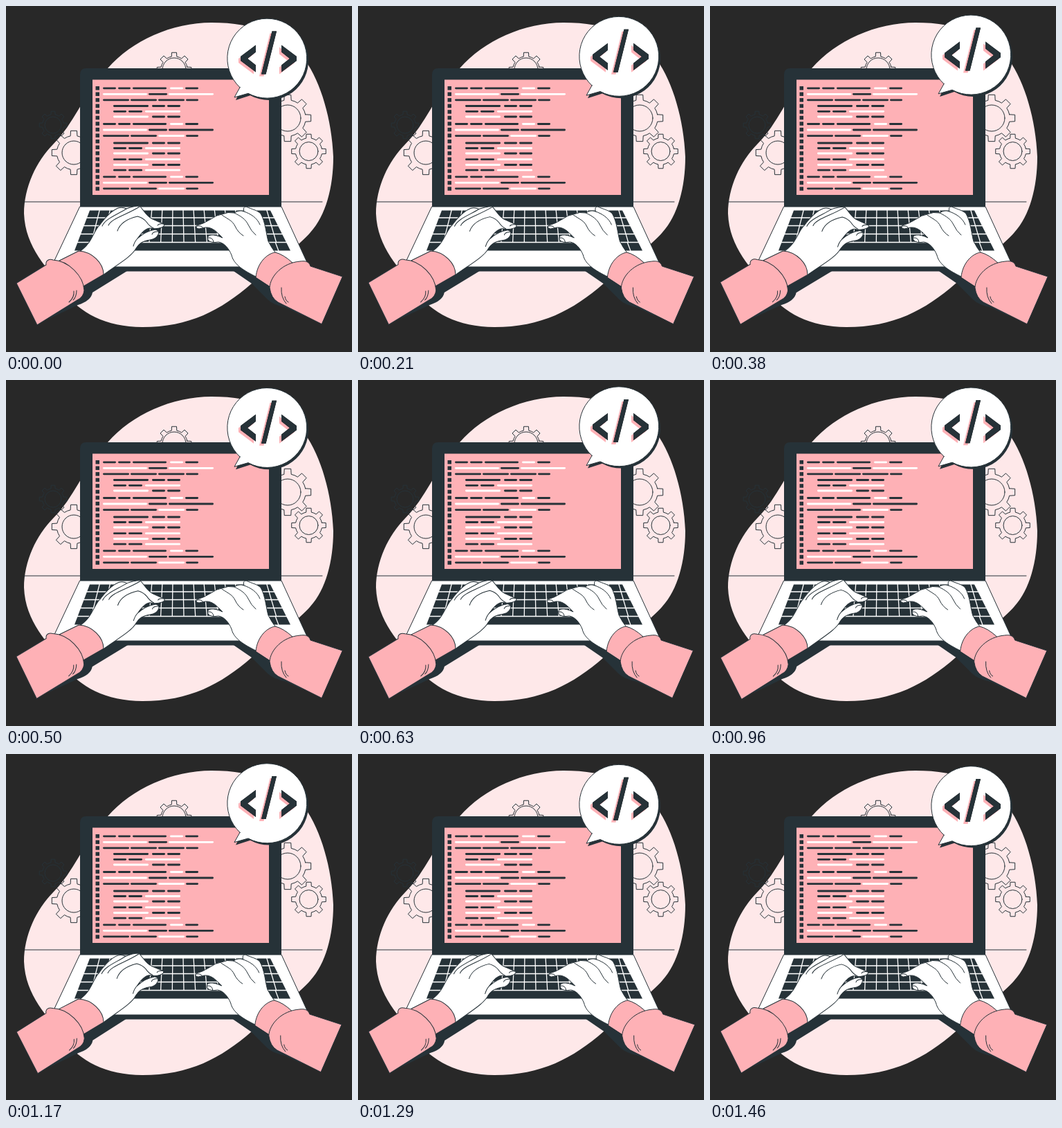
An HTML page for the animation above (1500 ms loop, 500 by 500 pixels).

```html
<!DOCTYPE html>
<html lang="en">
<head>
<meta charset="utf-8">
<title>Typing code</title>
<style>
  html, body { margin: 0; height: 100%; overflow: hidden; background: #282828; }
  svg { display: block; width: 100vw; height: 100vh; }
  .dark { fill: #263238; }
  .pink { fill: #feb1b6; }
  .white { fill: #fff; }
  .line { fill: none; }
  .line, .edge { stroke: #263238; stroke-width: 1; stroke-linecap: round; stroke-linejoin: round; }
</style>
</head>
<body>
<svg viewBox="0 0 500 500">
  <path fill="#fee8e9" d="M297 24C240 24 182 50 147 90C107 135 100 168 68 200C44 224 26 262 26 300C28 350 60 378 85 413C105 443 145 464 197 464C265 464 310 440 355 401C390 370 425 345 440 327C462 303 473 262 473 218C471 165 455 110 432 78C405 42 360 24 297 24Z"/>
  <g id="gears" class="line"></g>
  <path class="line" d="M26 283H457"/>

  <path class="dark" d="M107 290V99Q107 90 116 90H389Q398 90 398 99V290Z"/>
  <path class="pink" d="M125 106.500H380V273H125Z"/>
  <g id="code" stroke-width="2.8" stroke-linecap="round"></g>

  <path class="dark" d="M66 377H438V383.500H66Z"/>
  <path class="white edge" d="M107 290H398L438 377H66Z"/>
  <path class="dark" d="M121 295.500H382L411 353.500H99Z"/>
  <path id="keys" fill="none" stroke="#fff" stroke-width="1.3"/>

  <g id="left">
    <path class="dark" d="M62 452L104 432Q123 426 125 414L183 378L130 380Z"/>
    <path class="white edge" d="M106 355C124 344 126 326 135 317C143 306 152 296 162 292Q168 290 174 293Q184 289 193 289C200 296 203 304 212 308Q221 312 228 315Q230 318 225 320Q217 323 209 321Q201 320 190 336Q202 325 216 323Q222 325 220 330Q217 337 208 338C196 340 192 344 188 350C182 362 160 374 140 389Z"/>
    <path class="line" d="M139 318C144 307 160 302 174 293M148 317C152 307 174 302 193 290M161 325C165 313 177 307 190 304Q198 306 203 312Q207 318 213 321M219 317Q221 314 228 315M190 336Q186 340 184 347M211 330Q212 326 219 326"/>
    <path class="pink edge" d="M77 368L105 354C125 355 141 372 141 388L112 405Z"/>
    <path class="pink edge" d="M15 400.500L58 374C57 368 62 365 68 367C90 368 112 390 113 411Q112 421 103 425L45 461Z"/>
    <path class="line" d="M91 428Q99 421 98 412M97 425Q102 420 102 411"/>
  </g>

  <g id="right">
    <path class="dark" d="M320 377L355 401L378 424Q386 432 405 436L430 448L380 378Z"/>
    <path class="white edge" d="M361 391C345 383 329 374 326 360C322 350 315 342 307 341Q296 343 292 338Q290 332 296 331Q302 330 313 335L306 328Q297 319 288 320L279 322Q273 321 276 317Q285 315 296 308Q304 302 312 301Q321 297 330 299Q337 294 344 297Q342 290 347 290C356 294 363 295 368 300C375 312 376 330 379 340Q384 350 389 356Z"/>
    <path class="line" d="M312 302C322 309 327 310 331 318Q335 327 343 332M330 299C340 304 346 308 350 316Q354 325 361 331M344 297C353 300 363 306 367 316M276 318Q283 317 284 320M292 335Q299 334 300 341"/>
    <path class="pink edge" d="M361 392C363 371 377 358 389 356Q401 359 414 371L384 407Z"/>
    <path class="pink edge" d="M486 391L440 376C438 369 432 368 425 369C400 371 382 390 381 407Q383 422 393 428L456 459.500Z"/>
    <path class="line" d="M398 407Q397 421 405 430M403 420Q404 426 408 428"/>
  </g>

  <g id="bubble">
    <path class="dark" d="M340 119.600L332 136L353 129.200A57 57 0 1 0 340 119.600Z"/>
    <path class="white edge" d="M338 117.700L330 132L350 126.300A57.500 57.500 0 1 0 338 117.700Z"/>
    <g class="pink" transform="translate(-3 3)"><use href="#tag"/></g>
    <path id="tag" d="M361 56.500V66.500L349 76L361 85.500V95.500L339 79V73ZM384.500 36.500H391L375.500 98.500H369ZM398 56.500L420 73V79L398 95.500V85.500L410 76L398 66.500Z"/>
    <use href="#tag" class="dark"/>
  </g>
</svg>
<script>
const DARK = '#263238', LOOP = 1500;
const $ = id => document.getElementById(id);

function gear(cx, cy, outer, hole) {
  const at = (r, a) => `${cx + r * Math.cos(a)} ${cy + r * Math.sin(a)}`;
  const root = outer * 0.77;
  let d = '';
  for (let i = 0; i < 8; i++) {
    const a = i * Math.PI / 4;
    d += `${i ? `A${root} ${root} 0 0 1 ` : 'M'}${at(root, a - 0.2)}L${at(outer, a - 0.14)}L${at(outer, a + 0.14)}L${at(root, a + 0.2)}`;
  }
  d += `A${root} ${root} 0 0 1 ${at(root, -0.2)}Z`;
  return `<path d="${d}"/><circle cx="${cx}" cy="${cy}" r="${hole}"/>`;
}
$('gears').innerHTML = gear(243, 92, 25, 17) + gear(98, 212, 32, 17) +
  gear(68, 172, 20, 12) + gear(407, 162, 34, 19) + gear(437.5, 210, 25, 13.5);

// Segment layouts as [start, end] pairs; each row adds one colour letter per segment.
const layouts = {
  a: [[140, 159], [162, 180], [183, 232], [237, 256], [259, 278]],
  b: [[140, 204], [206, 233], [235, 300]],
  c: [[140, 178], [180, 218], [220, 258], [260, 278]],
  d: [[155, 206], [211, 230], [233, 252]],
  e: [[155, 174], [177, 197], [201, 252]]
};
const rows = `118.8 a dddwd,127.3 b wdw,135.8 c dddd,144.5 d ddd,152.3 e ddw,160 d wdd,
  170.5 a dddwd,179 b wdd,187.6 c ddwd,198 d ddd,205.5 e ddw,213 d wdd,
  221.7 e ddw,229.5 d wdd,237.2 e ddw,246.8 a dddwd,255.3 b wdd,263.8 c ddwd`.split(',');
$('code').innerHTML = rows.map((row, i) => {
  const [y, layout, colors] = row.trim().split(' ');
  return `<path fill="${DARK}" d="M129.500 ${116 + i * 8.55}h5.500v5.500h-5.500z"/>` +
    layouts[layout].map(([x1, x2], j) =>
      `<path stroke="${colors[j] === 'd' ? DARK : '#fff'}" d="M${x1 + 1.4} ${y}H${x2 - 1.4}"/>`).join('');
}).join('');

let grid = 'M105 306H400M100 317.500H400M100 329.500H408M90 341.500H410M389 341L394 354';
for (let i = -8; i <= 8; i++) grid += `M${256 + i * 15.1} 295L${257 + i * 16.7} 341.500`;
$('keys').setAttribute('d', grid);

// Triangle waves: swing goes 0, 1, 0, -1, 0 over each cycle; rise goes 0, 1, 0.
const swing = p => Math.abs(((p + 0.75) % 1) * 4 - 2) - 1;
const rise = p => 1 - Math.abs(2 * p - 1);

function draw(now) {
  const p = (now % LOOP) / LOOP;
  $('bubble').setAttribute('transform', `translate(0 ${-10 * rise(p)})`);
  $('left').setAttribute('transform', `rotate(${0.8 * swing(p)} 110 385)`);
  $('right').setAttribute('transform', `translate(${-2 * swing(p * 3 % 1)} 0)`);
  requestAnimationFrame(draw);
}
draw(performance.now());
</script>
</body>
</html>
```
